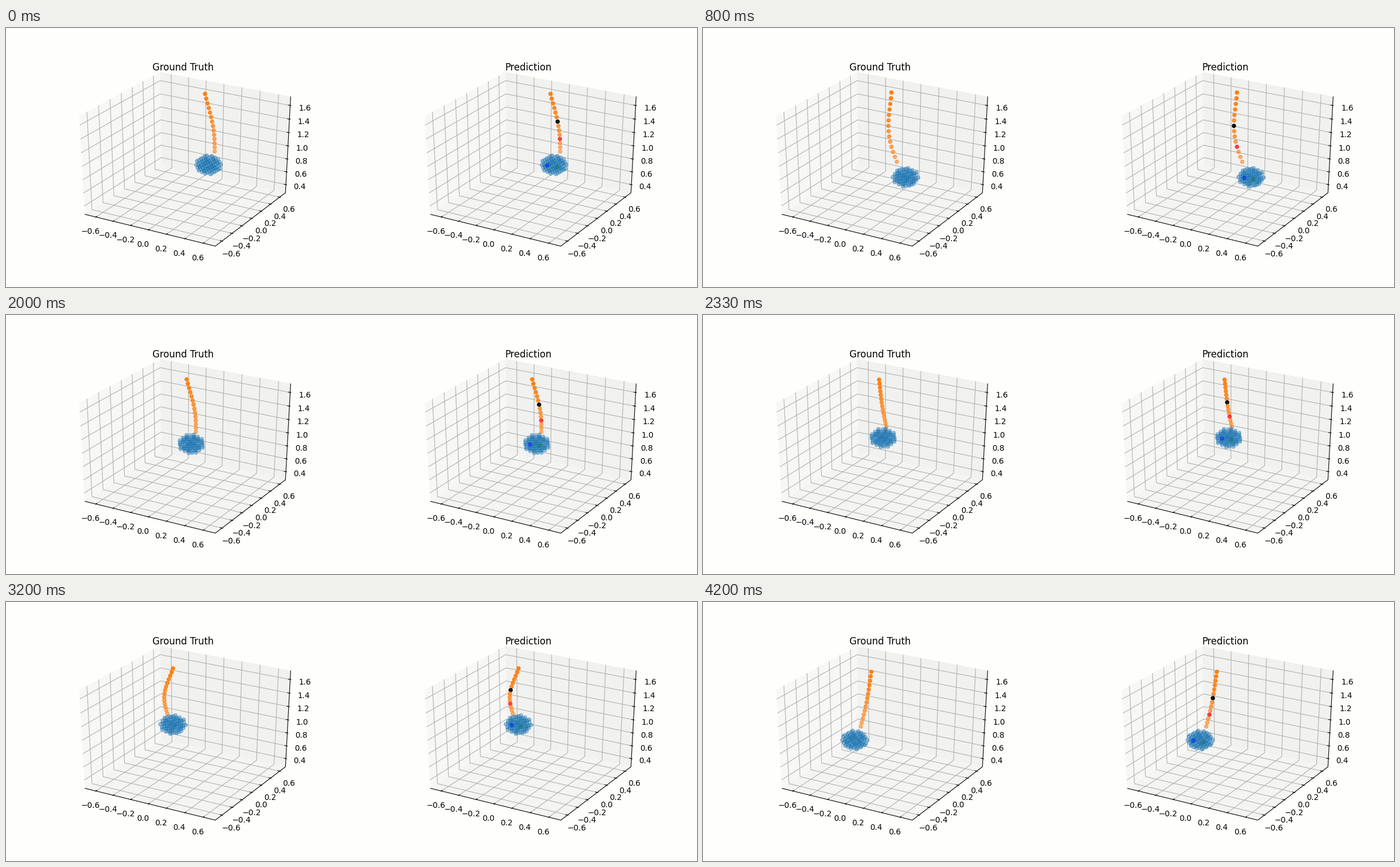
Write a matplotlib script that moves like this. It is 1222 px wide and 458 px high and loops after 4.27 s.

```python
import itertools

import matplotlib.pyplot as plt
import numpy as np
from matplotlib.animation import FuncAnimation
from matplotlib.collections import LineCollection

W, H, DPI = 1222, 458, 100
FRAMES, LOOP_MS = 64, 4270
PANEL_SHIFT = 611

# Camera: unit cube seen from azimuth -60, elevation 30, distance 10
RIGHT = np.array([0.866, 0.5, 0.0])
UP = np.array([-0.25, 0.433, 0.866])
TOWARD = np.array([0.433, -0.75, 0.5])
CENTER, SCALE = np.array([319.6, 226.3]), np.array([255.9, -190.6])
E = 0.5 + 1 / 48            # pane half size, a little beyond the limits
SPAN = 1.4                  # data range on every axis
LABEL_PAD = 0.074

ORANGE, BLUE = (1.0, 0.498, 0.055), (0.122, 0.467, 0.706)
ROPE_N, BLACK_I, RED_I = 14, 6, 10

# Key points of the swing
KEY_FRAMES = [0, 12, 21, 30, 40, 48, 63]
TOP_X = [352, 333.3, 330.2, 318, 302, 294.7, 298]
END_X = [369, 342.7, 346.6, 333.8, 307.2, 283, 278.8]
BALL_Y = [242, 264, 252, 225.5, 211, 218, 246]
BEND = [4.5, -10.3, 6, 3.8, -10, -9, 2.8]

LATTICE = 0.05 * np.array([p for p in itertools.product(range(-2, 3), repeat=3)
                           if sum(c * c for c in p) <= 6.25])
BALL_SCALE = SCALE / SPAN


def project(p):
    p = np.asarray(p, float)
    depth = 10 / (10 - p @ TOWARD)
    return CENTER + SCALE * np.array([p @ RIGHT, p @ UP]) * depth


def smooth(values, frame):
    """Cubic Hermite curve through the key points."""
    slopes = np.gradient(values, KEY_FRAMES)
    i = min(np.searchsorted(KEY_FRAMES, frame, side="right") - 1,
            len(KEY_FRAMES) - 2)
    h = KEY_FRAMES[i + 1] - KEY_FRAMES[i]
    t = (frame - KEY_FRAMES[i]) / h
    return ((2 * t**3 - 3 * t**2 + 1) * values[i]
            + (t**3 - 2 * t**2 + t) * h * slopes[i]
            + (3 * t**2 - 2 * t**3) * values[i + 1]
            + (t**3 - t**2) * h * slopes[i + 1])


def ball_center(frame):
    return np.array([358.2 - 1.8 * max(frame - 12, 0), smooth(BALL_Y, frame)])


def rope_points(frame):
    """A bent line whose links stretch slightly towards the top."""
    f = np.linspace(0, 1, ROPE_N)
    s = f + 0.08 * f * (1 - f)
    top_x, end_x = smooth(TOP_X, frame), smooth(END_X, frame)
    top_y = 113.5 + 10.5 * ((frame - 22) / 41) ** 2
    end_y = 215 + 0.83 * (smooth(BALL_Y, frame) - 238)
    x = top_x + (end_x - top_x) * s
    x += smooth(BEND, frame) * np.sin(np.pi * s**1.2)
    return np.column_stack([x, top_y + (end_y - top_y) * s])


def rotation(roll, yaw, spin):
    (ca, cb, cs), (sa, sb, ss) = (f(np.radians([roll, yaw, spin]))
                                  for f in (np.cos, np.sin))
    rz = np.array([[ca, -sa, 0], [sa, ca, 0], [0, 0, 1]])
    ry = np.array([[cb, 0, sb], [0, 1, 0], [-sb, 0, cb]])
    rx = np.array([[1, 0, 0], [0, cs, -ss], [0, ss, cs]])
    return rz @ ry @ rx


def ball_points(frame):
    # The lattice planes are seen edge-on at frames 21 and 40
    yaw = (25 * np.sin(np.pi * (frame - 21) / 19)
           + 0.04 * (frame - 21) * (frame - 40))
    pts = LATTICE @ rotation(-35, yaw, 25).T
    pts = pts[np.argsort(pts[:, 2])]
    z = pts[:, 2]
    alpha = 0.25 + 0.35 * (z - z[0]) / (z[-1] - z[0])
    colors = np.column_stack([np.tile(BLUE, (len(pts), 1)), alpha])
    return ball_center(frame) + pts[:, :2] * BALL_SCALE, colors


def draw_box(ax, shift, title):
    off = np.array([shift, 0])

    def path(*pts):
        return [project(p) + off for p in pts]

    panes = [
        ([(-E, -E, -E), (-E, E, -E), (-E, E, E), (-E, -E, E)], 0.95),
        ([(-E, E, -E), (E, E, -E), (E, E, E), (-E, E, E)], 0.90),
        ([(-E, -E, -E), (E, -E, -E), (E, E, -E), (-E, E, -E)], 0.925),
    ]
    for corners, gray in panes:
        ax.add_patch(plt.Polygon(path(*corners), fc=str(gray), alpha=0.5,
                                 lw=0, zorder=1))

    grid, ticks = [], []
    outer, inner, far = E + 0.1 / 12, E - 0.2 / 12, E + LABEL_PAD
    for k in range(7):
        value = -0.6 + 0.2 * k
        p = value / SPAN
        grid += [path((p, -E, -E), (p, E, -E), (p, E, E)),
                 path((E, p, -E), (-E, p, -E), (-E, p, E)),
                 path((-E, -E, p), (-E, E, p), (E, E, p))]
        ticks += [path((p, -outer, -E), (p, -inner, -E)),
                  path((outer, p, -E), (inner, p, -E)),
                  path((outer, E, p), (inner, E, p))]
        flat = ("\u2212" if k < 3 else "") + f"{abs(value):.1f}"
        labels = [((p, -far, -far), flat), ((far, p, -far), flat),
                  ((far, far, p), f"{value + 1:.1f}")]
        for spot, text in labels:
            x, y = project(spot) + off
            ax.text(x, y, text, fontsize=10, ha="center", va="top", zorder=4)

    axes_line = path((-E, -E, -E), (E, -E, -E), (E, E, -E), (E, E, E))
    ax.add_collection(LineCollection(grid, colors="#b0b0b0", linewidths=0.8,
                                     zorder=2))
    ax.add_collection(LineCollection(ticks + [axes_line], colors="black",
                                     linewidths=0.8, zorder=3))
    ax.text(313 + shift, 74.8, title, fontsize=12, ha="center", va="baseline",
            zorder=4)


def dots(ax, zorder):
    return ax.scatter([], [], s=20, linewidths=1.0, zorder=zorder)


def place(coll, pts, colors):
    coll.set_offsets(pts)
    coll.set_facecolor(colors)
    coll.set_edgecolor(colors)


plt.rcParams["font.family"] = "DejaVu Sans"
fig = plt.figure(figsize=(W / DPI, H / DPI), dpi=DPI, facecolor="#fefefc")
ax = fig.add_axes([0, 0, 1, 1])
ax.set_axis_off()
draw_box(ax, 0, "Ground Truth")
draw_box(ax, PANEL_SHIFT, "Prediction")
ax.set_xlim(0, W)
ax.set_ylim(H, 0)

ropes = [dots(ax, 5), dots(ax, 5)]
balls = [dots(ax, 6), dots(ax, 6)]
marks = dots(ax, 7)

rope_colors = np.column_stack([np.tile(ORANGE, (ROPE_N, 1)),
                               np.linspace(1, 0.55, ROPE_N)])
marked_colors = rope_colors.copy()
marked_colors[BLACK_I] = (0, 0, 0, 0.9)
marked_colors[RED_I] = (1, 0.05, 0.1, 0.75)
MARK_OFFSETS = np.array([[-12, 1], [5, 4]])
MARK_COLORS = [(0, 0.1, 1, 0.5), (0.05, 0.5, 0.2, 0.35)]


def update(frame):
    rope = rope_points(frame)
    ball, colors = ball_points(frame)
    shift = np.array([PANEL_SHIFT, 0])
    place(ropes[0], rope, rope_colors)
    place(ropes[1], rope + shift, marked_colors)
    place(balls[0], ball, colors)
    place(balls[1], ball + shift, colors)
    place(marks, ball_center(frame) + shift + MARK_OFFSETS, MARK_COLORS)
    return ropes + balls + [marks]


anim = FuncAnimation(fig, update, frames=FRAMES, interval=LOOP_MS / FRAMES,
                     init_func=lambda: update(0), repeat=True, repeat_delay=0)
plt.show()
```
